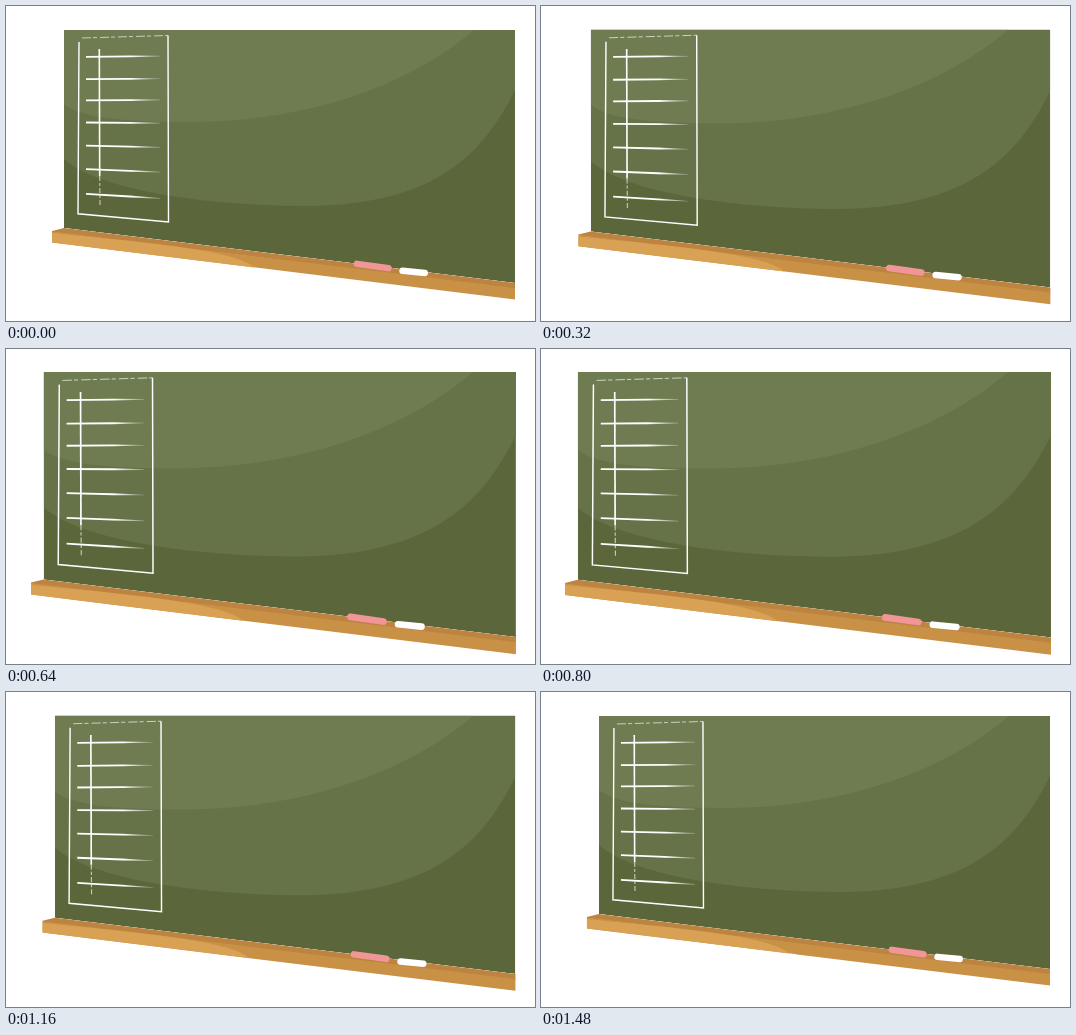
Animation, 529 px wide and 315 px high, one loop 1.6 s. Source, as an HTML page:

```html
<!DOCTYPE html>
<html lang="en">
<head>
<meta charset="utf-8">
<title>Chalkboard</title>
<style>
  html, body { margin: 0; height: 100%; overflow: hidden; background: #fff; }
  svg { display: block; width: 529px; height: 315px; }
</style>
</head>
<body>
<svg viewBox="0 0 529 315">
  <defs>
    <clipPath id="face"><path d="M58 24H509V277L58 222Z"/></clipPath>
    <linearGradient id="fade" gradientUnits="userSpaceOnUse" x1="80" x2="155">
      <stop offset=".6" stop-color="#fff"/>
      <stop offset="1" stop-color="#fff" stop-opacity=".25"/>
    </linearGradient>
  </defs>
  <g id="scene">
    <g clip-path="url(#face)">
      <path fill="#5b663a" d="M58 24H509V277L58 222Z"/>
      <path fill="#667248" d="M58 24H509V84C478 147 430 199 301 200C213 200 96 187 58 153Z"/>
      <path fill="#6f7b50" d="M58 24H468C408 76 309 115 187 116C132 116 77 114 58 98Z"/>
    </g>

    <path fill="#bd8341" d="M58 222L509 277V283L46 226V225Z"/>
    <path fill="#c99146" d="M46 225.5L509 282V293.5L46 236.5Z"/>
    <path fill="#d8a154" d="M46 227C110 234 228 242 248 261.4L46 236.5Z"/>

    <g stroke-width="6.4" stroke-linecap="round">
      <path stroke="#f19696" d="M351 257.8L382.5 262.2"/>
      <path stroke="#fff" d="M396.5 264.8L418.8 267"/>
    </g>

    <g fill="none" stroke="#fff" stroke-width="1.4">
      <path d="M73 36L72 207.8L162.5 216L162 29.5"/>
      <path d="M76 32L162 29.5" stroke-width=".9" stroke-dasharray="9 2 4 3" opacity=".7"/>
      <path d="M93.3 43L93.7 170" stroke-width="1.6"/>
      <path d="M93.7 170L94 199" stroke-width="1.1" stroke-dasharray="5 2 3 2" opacity=".65"/>
    </g>
    <g id="rows" fill="url(#fade)"></g>
  </g>
</svg>
<script>
const LOOP = 1600, STEP = 40, LAST = 37, PERIOD = 1500;
const scene = document.getElementById('scene');

// Each ruled line is a chalk stroke that thins out to the right: [left y, right y].
const rows = [[50.8, 50], [73.2, 72.6], [94.4, 93.8], [116.5, 117], [139.6, 141.3], [163.2, 166], [187.8, 192.3]];
document.getElementById('rows').innerHTML = rows.map(([a, b]) => {
  const mid = a + (b - a) * .6;
  return `<path d="M80 ${a - .9}L124 ${mid - .9}L154 ${b - .2}V${b + .4}L124 ${mid + .9}L80 ${a + .9}Z"/>`;
}).join('');

function draw(now) {
  const t = Math.min(Math.floor(now % LOOP / STEP), LAST) * STEP;
  const zoom = 1 + .025 * (1 - Math.cos(2 * Math.PI * t / PERIOD));
  scene.setAttribute('transform', `translate(489 44) scale(${zoom}) translate(-489 -44)`);
}

const start = performance.now();
function tick() {
  draw(performance.now() - start);
  requestAnimationFrame(tick);
}
tick();
</script>
</body>
</html>
```
